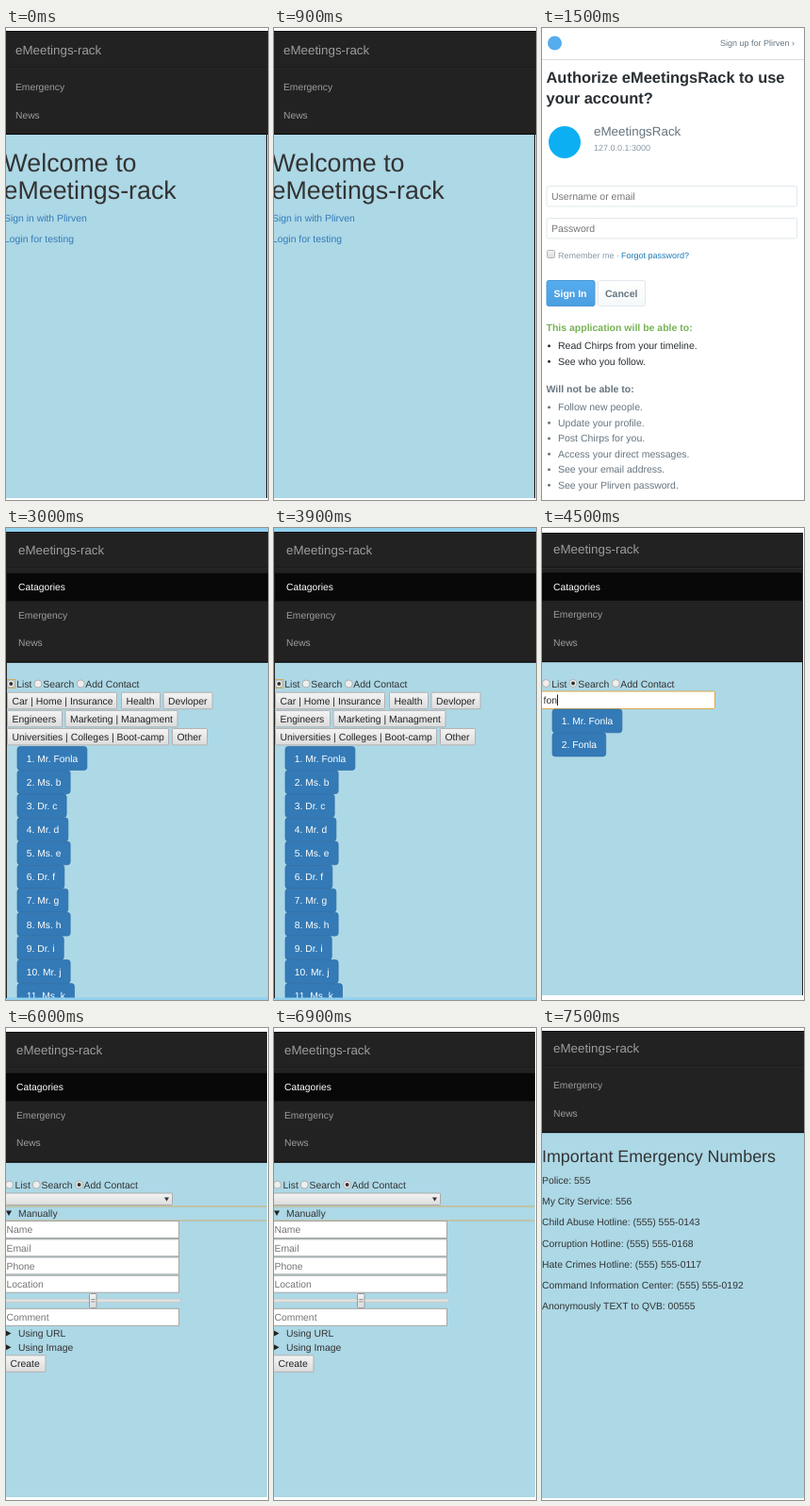
An HTML page that plays this animation: 278 px wide and 500 px high, repeating every 8 s.

```html
<!DOCTYPE html>
<html lang="en">
<head>
<meta charset="utf-8">
<title>Contact app tour</title>
<style>
  html, body { margin: 0; width: 100%; height: 100%; overflow: hidden; background: #fff; }
  svg { display: block; width: 278px; height: 500px; }
  text { font-family: "Liberation Sans", Arial, sans-serif; text-rendering: geometricPrecision; }
</style>
</head>
<body>
<svg id="stage" viewBox="0 0 278 500">
  <defs>
    <linearGradient id="gray" x2="0" y2="1"><stop stop-color="#f4f4f4"/><stop offset="1" stop-color="#dcdcdc"/></linearGradient>
    <linearGradient id="blue" x2="0" y2="1"><stop stop-color="#55acee"/><stop offset="1" stop-color="#4a9fe0"/></linearGradient>
    <linearGradient id="pale" x2="0" y2="1"><stop stop-color="#fff"/><stop offset="1" stop-color="#f5f8fa"/></linearGradient>
  </defs>
</svg>
<script>
const SCENE_MS = 1500, LOOP_MS = 8000;
const BODY = 10.4, INK = '#333', LINK = '#337ab7', SLATE = '#66757f', SKY = '#add8e6';
const APP = 'eMeetings-rack', APP_ID = 'eMeetingsRack', SITE = 'Plirven';
const pen = document.createElement('canvas').getContext('2d');

const text = (x, y, str, fill = INK, size = BODY, attrs = '') =>
  `<text x="${x}" y="${y}" fill="${fill}" font-size="${size}" ${attrs}>${str}</text>`;
const bold = (x, y, str, fill, size = 10.5) => text(x, y, str, fill, size, 'font-weight="700"');
const rect = (x, y, w, h, fill, attrs = '') =>
  `<rect x="${x}" y="${y}" width="${w}" height="${h}" fill="${fill}" ${attrs}/>`;
const framed = (x, y, w, h, fill, stroke, r = 0) =>
  rect(x + .5, y + .5, w - 1, h - 1, fill, `stroke="${stroke}" rx="${r}"`);
const circle = (x, y, r, fill, attrs = '') =>
  `<circle cx="${x}" cy="${y}" r="${r}" fill="${fill}" ${attrs}/>`;
const path = (d, fill) => `<path d="${d}" fill="${fill}"/>`;
const list = (items, draw) => items.map(draw).join('');

function textWidth(str, size) {
  pen.font = `100px "Liberation Sans", Arial, sans-serif`;
  return pen.measureText(str).width * size / 100;
}

// Dark menu bar; y is the baseline of the brand name.
function nav(x, top, y, items, active) {
  const bottom = y + 26.3 + 29.6 * items.length;
  return rect(0, top, 278, bottom - top, '#222') +
    rect(0, top, 278, 1, '#080808') + rect(0, bottom - 1, 278, 1, '#080808') +
    rect(0, y + 14, 278, 1, '#141414') + rect(0, y + 15, 278, .7, '#303030') +
    text(x, y, APP, '#9d9d9d', 13.35) +
    list(items, (name, i) =>
      (name === active ? rect(0, y + 20.3 + 29.6 * i, 278, 29.6, '#080808') : '') +
      text(x, y + 38.7 + 29.6 * i, name, name === active ? '#fff' : '#9d9d9d', 10.3));
}
const page = (top, bottom) => rect(0, top, 278, bottom - top, SKY);
const MENU = ['Emergency', 'News'], FULL_MENU = ['Catagories', ...MENU];

const radio = (x, y, on) =>
  circle(x, y, 4, '#eee', 'stroke="#aaa" stroke-width=".9"') + (on ? circle(x, y, 2, '#333') : '');
const tabs = (x, y, selected) => list(
  [['List', 0, 6], ['Search', 28.7, 34], ['Add Contact', 74, 79]],
  ([name, dot, label], i) => radio(x + dot, y, i === selected) + text(x + label, y + 4.2, name));

const grayButton = (x, y, w, label) =>
  framed(x, y, w, 18.5, 'url(#gray)', '#b0b0b0', 1) + text(x + 5.5, y + 13, label, '#222');
const contacts = (x, y, names) => list(names, (name, i) => {
  const label = `${i + 1}. ${name}`, top = y + 25.1 * i;
  return rect(x, top, textWidth(label, 10.3) + 19.5, 24.8, LINK,
      'rx="3" stroke="#2e6da4" stroke-width=".7"') +
    text(x + 9.8, top + 16.2, label, '#fff', 10.3);
});
const field = (y, label) =>
  framed(-1, y, 185, 19, '#fff', '#a5a5a5') + text(.5, y + 13.3, label, '#757575');
const bullets = (y, items, fill) => list(items, (item, i) =>
  circle(7.5, y - 3.3 + 16.5 * i, 1.5, fill) + text(17, y + 16.5 * i, item, fill, 10.5));

const welcome = () =>
  page(3, 498) + nav(10, 3, 27.5, MENU) +
  text(-2.5, 151.5, 'Welcome to', INK, 26.8) + text(-2.5, 181, APP, INK, 26.8) +
  text(-2, 205, `Sign in with ${SITE}`, LINK) + text(-2, 227, 'Login for testing', LINK) +
  rect(276, 3, 1, 495, '#222');

const authorize = () =>
  circle(13.5, 16, 7.5, '#55acee') +
  text(189, 19, `Sign up for ${SITE} ›`, SLATE, 9) + rect(0, 33, 278, 1, '#d8dde0') +
  bold(4.5, 58, `Authorize ${APP_ID} to use`, '#292f33', 16.45) +
  bold(4.5, 80, 'your account?', '#292f33', 16.45) +
  circle(24, 121, 17, '#0cb0f2') +
  text(55, 114, APP_ID, SLATE, 13.4) + text(55, 130, '127.0.0.1:3000', '#8899a6', 9) +
  list([['Username or email', 167], ['Password', 201]], ([label, y]) =>
    framed(4.5, y, 266.5, 22.5, '#fff', '#e1e8ed', 2) + text(10, y + 15, label, '#757575', 10.5)) +
  framed(5, 235, 9, 9, 'url(#gray)', '#b5b5b5', 1) +
  text(17, 244, 'Remember me ·', '#8899a6', 9) + text(84, 244, 'Forgot password?', '#1c7ab8', 9) +
  framed(4.5, 267, 52, 28, 'url(#blue)', '#4a98d6', 2) + bold(12.5, 285, 'Sign In', '#fff') +
  framed(59, 267, 51, 28, 'url(#pale)', '#e1e8ed', 2) + bold(67, 285, 'Cancel', SLATE) +
  bold(4.5, 321, 'This application will be able to:', '#77b255') +
  bullets(340, ['Read Chirps from your timeline.', 'See who you follow.'], '#292f33') +
  bold(4.5, 386, 'Will not be able to:', SLATE) +
  bullets(405, ['Follow new people.', 'Update your profile.', 'Post Chirps for you.',
    'Access your direct messages.', 'See your email address.', `See your ${SITE} password.`], SLATE);

const contactList = () =>
  page(4, 500) + nav(13, 4, 27.5, FULL_MENU, 'Catagories') +
  framed(.5, 160, 10, 10, 'none', '#d6a95a') + tabs(5.3, 165, 0) +
  grayButton(1, 173.7, 117, 'Car | Home | Insurance') + grayButton(122, 173.7, 42, 'Health') +
  grayButton(166.5, 173.7, 53, 'Devloper') +
  grayButton(1, 192.8, 59, 'Engineers') + grayButton(62.5, 192.8, 120, 'Marketing | Managment') +
  grayButton(1, 211.9, 172, 'Universities | Colleges | Boot-camp') +
  grayButton(176, 211.9, 38, 'Other') +
  contacts(12, 231.6, ['Mr. Fonla', ...Array.from('bcdefghijk',
    (letter, i) => `${['Ms.', 'Dr.', 'Mr.'][i % 3]} ${letter}`)]) +
  rect(0, 0, 278, 4, '#90d0ee') + rect(0, 497.5, 278, 2.5, '#90d0ee') +
  rect(0, 4, 1, 494, '#222');

const search = () =>
  page(5, 495) + nav(12, 5, 27, FULL_MENU, 'Catagories') + tabs(4.3, 164.5, 1) +
  framed(-1, 172.5, 185, 19.5, '#fff', '#d9a648', 1) + text(1.5, 186, 'fon') +
  rect(16, 176.5, 1, 11.5, '#222') +
  contacts(11, 192, ['Mr. Fonla', 'Fonla']) +
  rect(276, 5, 1, 490, '#222') + rect(277, 0, 1, 500, '#fff');

const addContact = () =>
  page(4, 497) + nav(11, 4, 27.5, FULL_MENU, 'Catagories') + tabs(3.6, 166, 2) +
  framed(-1, 174.5, 178, 13.5, 'url(#gray)', '#aaa', 1) + path('M168 179.5h5l-2.5 4z', '#333') +
  framed(-1, 188.5, 280, 16, 'none', '#d0b070') +
  path('M0 193.5h6l-3 5.5z', '#222') + text(13, 200.2, 'Manually') +
  field(204, 'Name') + field(223.3, 'Email') + field(242.4, 'Phone') + field(261.7, 'Location') +
  rect(-1, 287, 186, 3.5, '#e0e0e0', 'stroke="#c4c4c4" stroke-width=".6" rx="1"') +
  framed(88, 281, 8.5, 16, 'url(#gray)', '#999', 1) +
  list([287, 289.5], y => rect(90.3, y, 4, .9, '#888')) +
  field(296.8, 'Comment') +
  list([['Using URL', 327], ['Using Image', 341.7]], ([label, y]) =>
    path(`M0 ${y - 6.5}l5.5 3-5.5 3z`, '#222') + text(13, y, label)) +
  grayButton(-1, 346.3, 43.5, 'Create') + rect(277, 0, 1, 500, '#fff');

const emergency = () =>
  page(3, 498) + nav(12, 3, 25.6, MENU) +
  text(0, 142, 'Important Emergency Numbers', INK, 17.85) +
  list(['Police: 555', 'My City Service: 556', 'Child Abuse Hotline: (555) 555-0143',
    'Corruption Hotline: (555) 555-0168', 'Hate Crimes Hotline: (555) 555-0117',
    'Command Information Center: (555) 555-0192', 'Anonymously TEXT to QVB: 00555'],
    (line, i) => text(0, 164.6 + 22.3 * i, line));

const stage = document.getElementById('stage');
const scenes = [welcome, authorize, contactList, search, addContact, emergency].map(draw => {
  const group = document.createElementNS('http://www.w3.org/2000/svg', 'g');
  group.innerHTML = draw();
  return stage.appendChild(group);
});

function play() {
  const current = Math.floor(performance.now() % LOOP_MS / SCENE_MS);
  scenes.forEach((scene, i) => { scene.style.display = i === current ? '' : 'none'; });
  requestAnimationFrame(play);
}
play();
</script>
</body>
</html>
```
